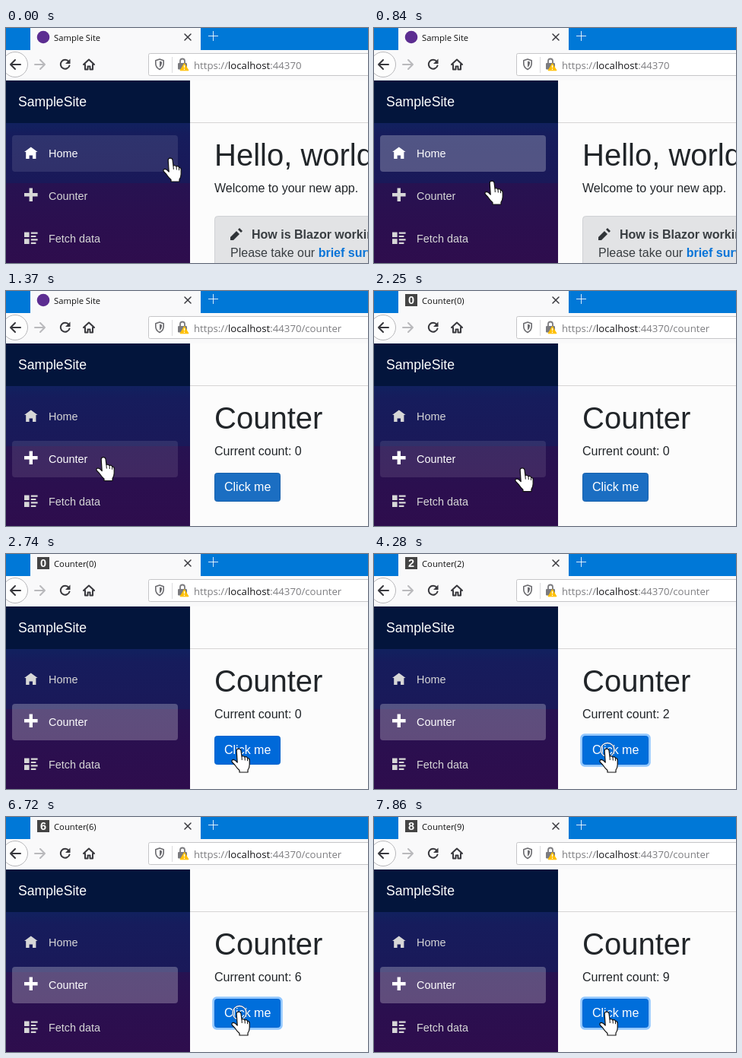
Animation, 476 px wide and 309 px high, one loop 8000 ms. Source, as an HTML page:

```html
<!DOCTYPE html>
<html lang="en">
<head>
<meta charset="utf-8">
<title>Counter demo</title>
<style>
html, body { margin: 0; width: 100%; height: 100%; overflow: hidden; }
svg { display: block; width: 100vw; height: 100vh; font: 16px "Liberation Sans", Arial, sans-serif; }
.chrome { font-family: "Open Sans", "Noto Sans", sans-serif; }
.line { fill: none; stroke: #38383d; stroke-width: 2; stroke-linecap: round; stroke-linejoin: round; }
.nav { font-size: 14.4px; }
</style>
</head>
<body>
<svg viewBox="0 0 476 309">
  <defs>
    <linearGradient id="top" x1="0" y1="0" x2="0" y2="1">
      <stop stop-color="#11215f"/><stop offset=".2" stop-color="#161c5c"/><stop offset="1" stop-color="#1a1959"/>
    </linearGradient>
    <linearGradient id="low" x1="0" y1="0" x2="0" y2="1">
      <stop stop-color="#271251"/><stop offset=".5" stop-color="#2b0f4f"/><stop offset="1" stop-color="#2e0d4d"/>
    </linearGradient>
  </defs>

  <!-- browser frame -->
  <rect width="476" height="309" fill="#fcfcfc"/>
  <rect y="29" width="476" height="40" fill="#f9f9fa"/>
  <rect width="476" height="29" fill="#0078d7"/>
  <rect x="32" width="224" height="29" fill="#f9f9fa"/>
  <circle id="dot" cx="49" cy="12" r="8.3" fill="#5c2d91"/>
  <g id="badge">
    <rect x="41" y="4" width="16" height="16" fill="#444"/>
    <text id="digit" x="49" y="17.2" text-anchor="middle" font-size="14.5" font-weight="bold" fill="#fff"></text>
  </g>
  <text id="title" class="chrome" x="63" y="16.500" font-size="11.25" fill="#111"></text>
  <path class="line" style="stroke-width:1.5" d="M235 8l8 8m0-8l-8 8"/>
  <path d="M266 10.500h13m-6.500-6.500v13" stroke="#fff" stroke-opacity=".85"/>

  <circle cx="12" cy="48" r="16.500" fill="#fdfdfd" stroke="#b8b8bb"/>
  <path class="line" d="M19 48H6m6-6l-6 6 6 6"/>
  <path class="line" style="stroke:#b9b9bc" d="M38 48h13m-6-6l6 6-6 6"/>
  <path class="line" d="M82.500 44a6 6 0 1 0 1 5.500"/>
  <path d="M84.500 40.500v6.500h-6.500z" fill="#38383d"/>
  <path class="line" d="M102 48l7-6.500 7 6.500m-12 0v6.500h3.500v-4h3v4h3.500v-6.500"/>

  <rect x="187.500" y="33.500" width="300" height="29" rx="2" fill="#fff" stroke="#c6c6c8"/>
  <path d="M218.500 38v21" stroke="#dcdcde"/>
  <path class="line" style="stroke:#6c6c70;stroke-width:1.6" d="M202 41l5.200 1.800v4q0 5-5.200 7.700q-5.200-2.700-5.200-7.700v-4z"/>
  <path d="M202 43.500v8.500q3-2.200 3-5.700v-1.900z" fill="#6c6c70"/>
  <path d="M229 46v-2.500a3 3 0 0 1 6 0v2.500" fill="none" stroke="#7b7b7f" stroke-width="1.8"/>
  <rect x="226" y="46" width="12" height="8.500" rx="1.300" fill="#7b7b7f"/>
  <path d="M234.500 46.500l5.500 9.300h-11z" fill="#ffbf00" stroke="#ffbf00" stroke-linejoin="round"/>
  <path d="M234.500 48.800v3.500m0 1.300v1.400" stroke="#fff" stroke-width="1.3"/>
  <text class="chrome" x="247" y="53.500" font-size="13.2" fill="#7d7d80">https://<tspan fill="#151518">localhost</tspan>:44370<tspan id="path"></tspan></text>

  <!-- sidebar -->
  <rect y="69" width="242" height="56" fill="#03153c"/>
  <rect y="125" width="242" height="79" fill="url(#top)"/>
  <rect y="204" width="242" height="105" fill="url(#low)"/>
  <text x="16" y="103" font-size="17.6" fill="#fff">SampleSite</text>
  <g id="home" class="nav">
    <rect x="8" y="141" width="218" height="48" rx="4" fill="#fff"/>
    <text x="56" y="170">Home</text>
    <path transform="translate(24 156.500) scale(2.2)" d="M4 0l-4 3h1v4h2v-2h2v2h2v-4h1z"/>
  </g>
  <g id="counter" class="nav">
    <rect x="8" y="197" width="218" height="48" rx="4" fill="#fff"/>
    <text x="56" y="226">Counter</text>
    <path transform="translate(24 210.500) scale(2.2)" d="M3 0v3h-3v2h3v3h2v-3h3v-2h-3v-3z"/>
  </g>
  <g class="nav" fill="#d7d7d7">
    <text x="56" y="282">Fetch data</text>
    <path transform="translate(24 268.500) scale(2.2)" d="M0 0v3h3v-3zm4 0v1h4v-1zm0 2v1h3v-1zm-4 2v3h3v-3zm4 0v1h4v-1zm0 2v1h3v-1z"/>
  </g>

  <!-- page -->
  <path d="M242 124.500h234" stroke="#d6d5d5"/>
  <g id="hello" fill="#212529">
    <text x="274" y="181" font-size="40">Hello, world!</text>
    <text x="274" y="216">Welcome to your new app.</text>
    <rect x="274.500" y="247.500" width="230" height="90" rx="4" fill="#e2e3e5" stroke="#cfd1d4"/>
    <path transform="translate(295 263) scale(2)" d="M6 0l-1 1 2 2 1-1zm-2 2l-4 4v2h2l4-4z" fill="#303438"/>
    <g fill="#383d41">
      <text x="323" y="277" font-weight="bold">How is Blazor working for you?</text>
      <text x="295" y="301">Please take our <tspan font-weight="bold" fill="#0874d8">brief survey</tspan></text>
    </g>
  </g>
  <g id="page" fill="#212529">
    <text x="274" y="181" font-size="40">Counter</text>
    <text x="274" y="216">Current count: <tspan id="count"></tspan></text>
    <rect id="focus" x="271.300" y="236.300" width="92.400" height="43.400" rx="5.500" fill="#92c7ff"/>
    <rect id="button" x="274.500" y="239.500" width="86" height="37" rx="3"/>
    <text x="287" y="263" fill="#fff">Click me</text>
  </g>

  <!-- pointer -->
  <g id="pointer">
    <g id="press" fill="none">
      <circle cy="1.500" r="9" stroke="#1c3c70" stroke-opacity=".6" stroke-width="2.600"/>
      <circle cy="1.500" r="9" stroke="#fff" stroke-width="1.300"/>
    </g>
    <g id="hand" fill="#fff" stroke="#111" stroke-width="1.200" stroke-linejoin="round">
      <path d="M-3.800 3C-4 -.5 1.500 -.8 2 2.500L3 10Q5 8.800 7 11Q9.500 10 10.500 12.200Q13.200 12.500 13.200 15.500V21Q13.200 25 11 28V31H0V28.500Q-3 26 -6 21.500L-9.800 17.500Q-10.800 14.500 -7.800 14.300Q-5.500 14.800 -2.800 18Z"/>
      <path d="M3 10l.3 5m3.700-4l.3 4.500m3.200-3.300v4" stroke-width="1"/>
    </g>
    <path id="arrow" d="M0 0V24L5.500 19L9.500 28L13.500 26.300L9.500 17.500H17Z" fill="#fff" stroke="#111" stroke-width="1.2"/>
  </g>
</svg>
<script>
const LOOP = 8000, STEP = 60;
// press time, time the tab icon catches up
const clicks = [[2950, 3190], [3540, 3780], [4280, 4470], [4950, 5190], [5550, 5770],
  [6060, 6310], [6660, 6910], [7180, 7430], [7710, 8100]];
// time, x, y
const route = [[600, 217, 171], [840, 156, 201], [1040, 129, 218.5]];
const goal = [307, 256];

const $ = id => document.getElementById(id);
const set = (id, attrs) => { for (const k in attrs) $(id).setAttribute(k, attrs[k]); };
const show = (id, on) => set(id, { visibility: on ? 'visible' : 'hidden' });
const text = (id, s) => { if ($(id).textContent !== s) $(id).textContent = s; };
const clamp = v => Math.min(1, Math.max(0, v));
const mix = (a, b, p) => a + (b - a) * p;

function pointerAt(t) {
  const [end, restX, restY] = route[2];
  if (t >= 2010) {
    const k = clamp((Math.floor((t - 2010) / STEP) + 1) / 12);
    const p = k * k * (3 - 2 * k);
    return [mix(restX, goal[0], p), mix(restY, goal[1], p)];
  }
  if (t >= end) return [restX, restY];
  const s = Math.max(600, Math.floor(t / STEP) * STEP);
  const i = s < 840 ? 0 : 1, [t0, x0, y0] = route[i], [t1, x1, y1] = route[i + 1];
  const p = (s - t0) / (t1 - t0);
  return [mix(x0, x1, p), mix(y0, y1, p)];
}

function link(id, active, hover) {
  set(id, { fill: active || hover ? '#fff' : '#d7d7d7' });
  $(id).firstElementChild.setAttribute('fill-opacity', hover ? .1 : active ? .25 : 0);
}

function draw(t) {
  const [x, y] = pointerAt(t);
  const opened = t >= 1370, onButton = x >= 274, focused = t >= 2950;
  const count = clicks.filter(c => t >= c[0] + 80).length;
  const icon = clicks.filter(c => t >= c[1]).length;

  link('home', !opened, t < 780);
  link('counter', opened, t >= 900 && x <= 226);
  show('hello', !opened);
  show('page', opened);
  text('path', opened ? '/counter' : '');
  text('title', t < 1500 ? 'Sample Site' : `Counter(${count})`);
  text('digit', String(icon));
  text('count', String(count));
  show('dot', t < 1570);
  show('badge', t >= 1570);

  const [fill, stroke] = focused ? ['#006edb', '#0066d0']
    : onButton ? ['#0069d9', '#0062cc'] : ['#1b6ec2', '#1861ac'];
  set('button', { fill, stroke });
  set('focus', { opacity: clamp((t - 2950) / 150) });

  set('pointer', { transform: `translate(${x} ${y})` });
  const arrow = x > 226 && !onButton;
  show('hand', !arrow);
  show('arrow', arrow);
  show('press', (t >= 1250 && t < 1370) || clicks.some(c => t >= c[0] && t < c[0] + 150));
}

function frame() {
  draw(performance.now() % LOOP);
  requestAnimationFrame(frame);
}
frame();
</script>
</body>
</html>
```
